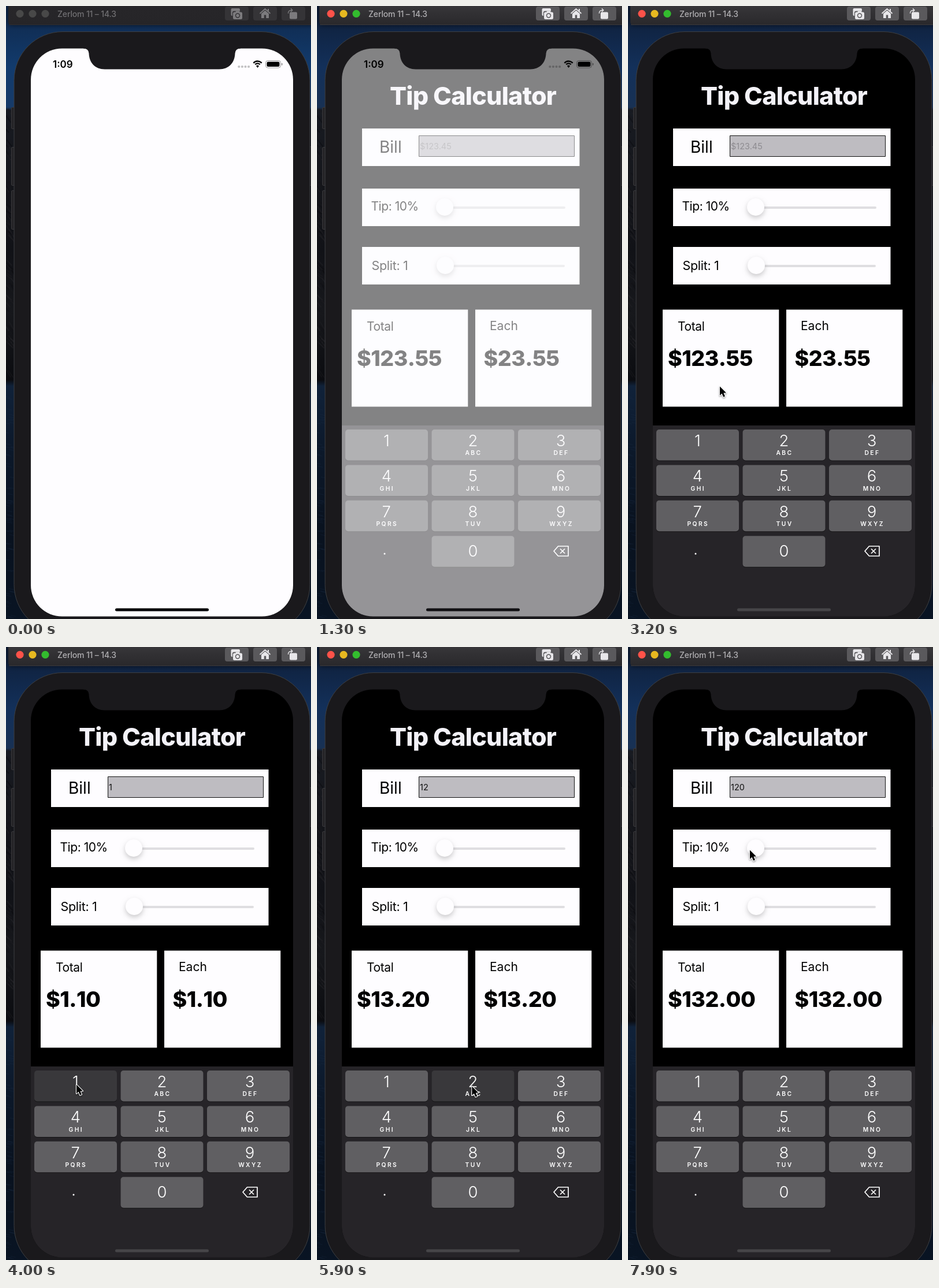
An HTML page with a canvas for the animation above (8 s loop, 528 by 1061 pixels).

```html
<!DOCTYPE html>
<html lang="en">
<head>
<meta charset="utf-8">
<title>Tip Calculator</title>
<style>
html, body { margin: 0; width: 100%; height: 100%; overflow: hidden; background: #0c1526; }
canvas { display: block; width: 528px; height: 1061px; }
</style>
</head>
<body>
<canvas id="stage"></canvas>
<script>
const W = 528, H = 1061, LOOP = 8000, STEP = 100;
const FONT = 'Inter, "Liberation Sans", sans-serif';
const canvas = document.getElementById('stage');
const ctx = canvas.getContext('2d');
const dpr = window.devicePixelRatio || 1;
canvas.width = W * dpr;
canvas.height = H * dpr;

const BLACK = '#000', WHITE = '#fefdff';
const KEYS = ['1', '2 ABC', '3 DEF', '4 GHI', '5 JKL', '6 MNO', '7 PQRS', '8 TUV', '9 WXYZ', '.', '0', 'del'];

// key index, press time, time the digit arrives
const PRESSES = [[0, 3800, 4000], [1, 5800, 5900], [10, 6700, 6800]];

// time, x, y of the pointer tip
const PATH = [
  [2000, 110, 428], [2200, 60, 250], [2500, 76, 147], [2700, 75, 147], [2800, 76, 148],
  [3000, 88, 215], [3200, 159, 658], [3500, 130, 752], [3800, 122, 757], [4000, 122, 757],
  [4300, 170, 880], [4600, 250, 996], [4900, 282, 960], [5000, 285, 948], [5300, 283, 850],
  [5700, 269, 760], [6000, 268, 760], [6600, 272, 938], [6900, 272, 938], [7200, 250, 650],
  [7500, 200, 436], [7700, 200, 400], [7900, 211, 351]
];

const clamp = v => Math.max(0, Math.min(1, v));
const mix = (a, b, p) => a + (b - a) * p;
const gray = v => `rgb(${Math.round(v)},${Math.round(v - 1)},${Math.round(v + 2)})`;

function box(x, y, w, h, fill, r = 0, stroke) {
  ctx.beginPath();
  ctx.roundRect(x, y, w, h, r);
  if (fill) { ctx.fillStyle = fill; ctx.fill(); }
  if (stroke) { ctx.strokeStyle = stroke; ctx.lineWidth = 1; ctx.stroke(); }
}

function dot(x, y, r, fill) {
  ctx.beginPath();
  ctx.arc(x, y, r, 0, Math.PI * 2);
  ctx.fillStyle = fill;
  ctx.fill();
}

function line(points, color, width, close) {
  ctx.beginPath();
  points.forEach(([x, y]) => ctx.lineTo(x, y));
  if (close) ctx.closePath();
  ctx.strokeStyle = color;
  ctx.lineWidth = width;
  ctx.stroke();
}

function text(str, x, y, size, weight, fill, spacing = 0, align = 'left') {
  ctx.font = `${weight} ${size}px ${FONT}`;
  ctx.letterSpacing = spacing + 'px';
  ctx.textAlign = align;
  ctx.fillStyle = fill;
  ctx.fillText(str, x, y);
}

function vertical(y0, y1, stops) {
  const g = ctx.createLinearGradient(0, y0, 0, y1);
  stops.forEach(([at, color]) => g.addColorStop(at, color));
  return g;
}

function random(seed) {
  return () => (seed = (seed * 16807) % 2147483647) / 2147483647;
}

function wallpaper(active) {
  ctx.fillStyle = vertical(0, H, [
    [0, active ? '#0e1d36' : '#0f2749'], [0.1, active ? '#13305a' : '#123b6d'],
    [0.165, active ? '#183154' : '#173b69'], [0.17, '#181b22'], [0.3, '#15161b'],
    [0.4, '#111217'], [0.5, '#17181c'], [0.61, '#0b0c10'], [0.62, '#10223a'],
    [0.72, '#0c192b'], [0.85, '#09121f'], [1, '#091423']
  ]);
  ctx.fillRect(0, 0, W, H);
  const rnd = random(77);
  for (let i = 0; i < 90; i++) {
    const x = rnd() * 14, y = 182 + rnd() * 465, v = 10 + rnd() * 28;
    line([[x - 5, y - 6], [x + 4, y + rnd() * 9]], `rgba(${v},${v},${v + 4},.5)`, 2);
  }
  for (let i = 0; i < 60; i++) {
    const x = rnd() * 12, y = 660 + rnd() * 400;
    line([[x - 4, y], [x + 5, y + 2]], 'rgba(34,54,80,.25)', 1);
  }
}

function titleBar(a) {
  ctx.save();
  ctx.shadowColor = 'rgba(0,0,0,.6)';
  ctx.shadowBlur = 8;
  box(4, -10, 540, 43, vertical(0, 33, [[0, gray(mix(39, 55, a))], [1, gray(mix(38, 41, a))]]), 5);
  ctx.restore();
  box(5, 32, 523, 1, gray(mix(46, 58, a)));

  const lights = [[255, 82, 73], [231, 184, 32], [51, 188, 46]];
  lights.forEach((c, i) => {
    const [r, g, b] = c.map(v => mix(72, v, a));
    dot(24 + i * 22, 13.3, 6.6, `rgb(${r},${g},${b})`);
  });
  text('Zerlom 11 – 14.3', 89, 18.5, 14, 500, gray(mix(112, 176, a)), -0.15);

  const face = gray(mix(53, 90, a)), ink = gray(mix(124, 232, a));
  [379, 428, 477].forEach(x => box(x, 1, 41, 24, face, 4));
  ctx.lineJoin = 'round';

  // screenshots
  box(389.5, 4, 15.5, 13, ink, 2);
  box(391.8, 8.8, 19, 15, face, 3);
  box(393, 10.5, 16, 12.5, ink, 2.5);
  box(397.5, 8.5, 7, 4, ink, 1.5);
  dot(401, 16.5, 4.2, face);
  dot(401, 16.5, 2.7, ink);

  // home
  line([[439.5, 13], [448.5, 5], [457.5, 13]], ink, 1.7);
  ctx.beginPath();
  [[442, 13.3], [448.5, 7.8], [455, 13.3], [455, 21], [442, 21]].forEach(p => ctx.lineTo(...p));
  ctx.fillStyle = ink;
  ctx.fill();
  box(453, 5, 2, 4, ink);
  box(446.8, 15.5, 3.4, 5.5, face);

  // rotate
  box(491, 10.5, 13, 12, ink, 2);
  ctx.beginPath();
  ctx.moveTo(488.5, 13);
  ctx.quadraticCurveTo(488, 7.5, 495, 7.2);
  ctx.strokeStyle = ink;
  ctx.lineWidth = 1.4;
  ctx.stroke();
  line([[493, 4.3], [496, 7.2], [493, 10]], ink, 1.3);
}

function phoneBody() {
  [[9, 175, 37], [9, 244, 66], [9, 319, 67], [524, 243, 67]].forEach(([x, y, h]) =>
    box(x + 0.5, y + 0.5, 8, h, '#242326', 1.5, '#39383b'));
  box(14, 44.5, 512, 1041, '#1a191c', 84, '#3d3f42');
}

function notch() {
  ctx.beginPath();
  ctx.moveTo(134, 72);
  ctx.lineTo(134, 73.5);
  ctx.quadraticCurveTo(143, 73.5, 143.5, 82);
  ctx.bezierCurveTo(144, 98, 154, 109.5, 171, 109.5);
  ctx.lineTo(369, 109.5);
  ctx.bezierCurveTo(386, 109.5, 396, 98, 396.5, 82);
  ctx.quadraticCurveTo(397, 73.5, 406, 73.5);
  ctx.lineTo(406, 72);
  ctx.fillStyle = '#1a191c';
  ctx.fill();
}

function statusBar() {
  text('1:09', 81, 107, 17, 600, BLACK);
  for (let i = 0; i < 4; i++) dot(403.3 + i * 5.6, 105, 2.1, 'rgba(0,0,0,.24)');
  ctx.strokeStyle = BLACK;
  [9.5, 5.6].forEach(r => {
    ctx.beginPath();
    ctx.arc(435.5, 105, r, -Math.PI * 0.77, -Math.PI * 0.23);
    ctx.lineWidth = 2.4;
    ctx.stroke();
  });
  ctx.beginPath();
  ctx.moveTo(435.5, 107);
  ctx.arc(435.5, 106, 3.3, -Math.PI * 0.77, -Math.PI * 0.23);
  ctx.fillStyle = BLACK;
  ctx.fill();
  box(449.5, 94.5, 26, 12.5, null, 4, 'rgba(0,0,0,.4)');
  box(451.5, 96.5, 22, 8.5, BLACK, 2.3);
  box(477, 98.8, 1.5, 4, 'rgba(0,0,0,.45)', 1);
}

function slider(knobX, knobY, endX) {
  box(knobX - 14, knobY - 1, endX - knobX + 14, 4, '#dfdee1', 2);
  ctx.save();
  ctx.shadowColor = 'rgba(0,0,0,.2)';
  ctx.shadowBlur = 9;
  ctx.shadowOffsetY = 4;
  dot(knobX, knobY, 15, WHITE);
  ctx.restore();
}

function keyShade(index, t) {
  let shade = 96;
  for (const [key, down, typed] of PRESSES) {
    if (key === index && t >= down) shade = mix(57, 96, clamp((t - typed - 50) / 250));
  }
  return shade;
}

function keypad(t) {
  box(43, 726, 454, 340, '#262428');
  KEYS.forEach((key, i) => {
    const x = [49, 198.5, 348][i % 3], y = 733 + Math.floor(i / 3) * 61.4;
    const mid = [120.3, 270, 422][i % 3];
    if (key === '.') { dot(117, 948, 1.5, '#fff'); return; }
    if (key === 'del') {
      line([[410, 943.5], [417.5, 935], [435, 935], [435, 952], [417.5, 952]], '#fff', 1.7, true);
      line([[421, 939.5], [429, 947.5]], '#fff', 1.7);
      line([[429, 939.5], [421, 947.5]], '#fff', 1.7);
      return;
    }
    box(x, y + 1, 143, 53.5, '#151416', 5);
    box(x, y, 143, 53.5, gray(keyShade(i, t)), 5);
    const [digit, letters] = key.split(' ');
    text(digit, mid, y + (digit === '0' ? 35.5 : 28.7), 27.5, 350, '#fff', 0, 'center');
    if (letters) text(letters, mid + 1, y + 44.2, 10.3, 600, '#fff', 2.4, 'center');
  });
}

function app(t) {
  box(43, 73, 454, 983, BLACK);
  text('Tip Calculator', 270, 171, 43, 800, '#f3f2f8', -0.75, 'center');

  [212, 316, 417].forEach(y => box(78, y, 376.5, 65, WHITE));
  text('Bill', 108, 254, 28, 400, BLACK);
  box(176.5, 224.5, 269, 36, '#bebcc1', 0, '#111');

  const bill = PRESSES.filter(p => t >= p[2]).map(p => KEYS[p[0]][0]).join('');
  text(bill || '$123.45', 178, 248, 14.5, 400, bill ? '#111' : '#8d8b90');

  text('Tip: 10%', 93.5, 354, 21, 400, BLACK, -0.45);
  slider(221, 348, 430);
  text('Split: 1', 94.5, 457, 21.5, 400, BLACK, -0.3);
  slider(222, 449, 429);

  [60, 274].forEach(x => box(x, 525.5, 201.3, 168, WHITE));
  text('Total', 86, 562, 21, 400, BLACK, -0.4);
  text('Each', 299, 561, 21, 400, BLACK);
  const sum = bill && '$' + (bill * 1.1).toFixed(2);
  ctx.fontKerning = 'none';
  text(sum || '$123.55', 69, 623, 37.5, 800, BLACK, -0.5);
  text(sum || '$23.55', 288.5, 623, 37.5, 800, BLACK, -0.5);
  ctx.fontKerning = 'auto';

  keypad(t);
}

function pointer(t) {
  if (t < PATH[0][0]) return;
  let i = 0;
  while (i < PATH.length - 2 && t >= PATH[i + 1][0]) i++;
  const a = PATH[i], b = PATH[i + 1];
  const p = clamp((t - a[0]) / (b[0] - a[0]));
  ctx.save();
  ctx.translate(mix(a[1], b[1], p), mix(a[2], b[2], p) + 0.5);
  ctx.beginPath();
  [[0, 0], [0, 15.5], [3.5, 12.3], [6.2, 18.3], [9, 17], [6.4, 11.3], [11, 11]].forEach(q => ctx.lineTo(...q));
  ctx.closePath();
  ctx.shadowColor = 'rgba(0,0,0,.4)';
  ctx.shadowBlur = 3;
  ctx.shadowOffsetY = 1.5;
  ctx.strokeStyle = '#fff';
  ctx.lineWidth = 2.2;
  ctx.lineJoin = 'round';
  ctx.stroke();
  ctx.shadowColor = 'transparent';
  ctx.fillStyle = BLACK;
  ctx.fill();
  ctx.restore();
}

function draw(t) {
  const active = t < 500 ? 0 : t < 600 ? 0.75 : 1;
  const u = clamp((t - 1110) / 390);
  const shown = u * u * (3 - 2 * u);

  ctx.setTransform(dpr, 0, 0, dpr, 0, 0);
  wallpaper(active);
  titleBar(active);
  phoneBody();

  ctx.save();
  ctx.beginPath();
  ctx.roundRect(43, 73.5, 454, 983, 54);
  ctx.clip();
  app(t);
  ctx.globalAlpha = 1 - shown;
  box(43, 73, 454, 984, WHITE);
  ctx.globalAlpha = 1;
  statusBar();
  box(189, 1042.5, 162, 5, gray(mix(1, 70, shown * shown)), 2.5);
  ctx.restore();

  notch();
  pointer(t);
}

let last = -1;
const start = performance.now();
function tick(now) {
  const t = Math.floor((Math.max(0, now - start) % LOOP) / STEP) * STEP;
  if (t !== last) draw(last = t);
  requestAnimationFrame(tick);
}
draw(0);
requestAnimationFrame(tick);
</script>
</body>
</html>
```
